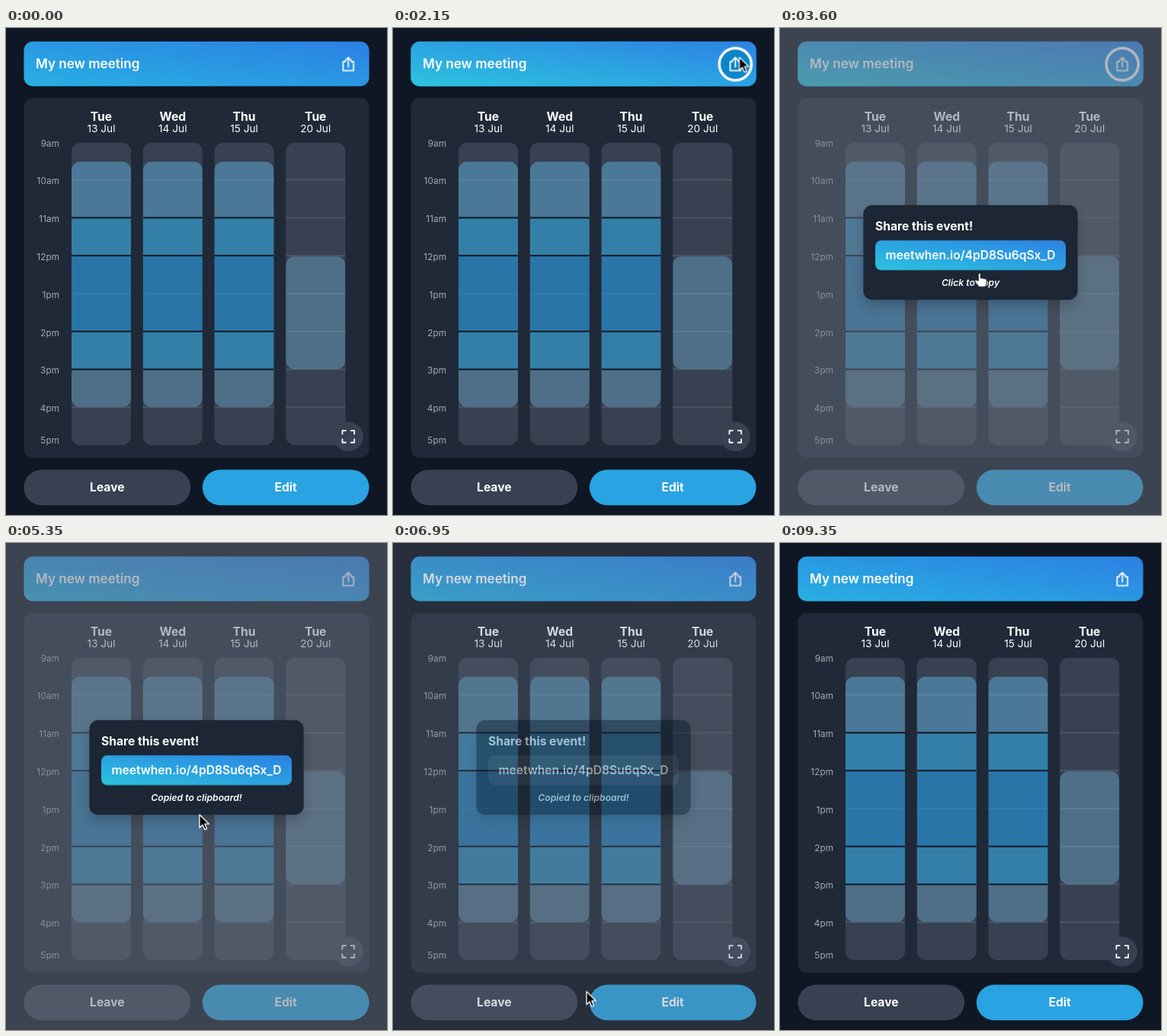
Recreate the animation shown at these times as an HTML page. Size 500 by 640 pixels, loop 9.5 s.

```html
<!DOCTYPE html>
<html lang="en">
<head>
<meta charset="utf-8">
<title>Meeting planner</title>
<style>
  html, body { margin: 0; width: 100%; height: 100%; overflow: hidden; background: #0f1724; }
  svg { display: block; width: 500px; height: 640px; }
  text { font-family: Inter, Roboto, "Liberation Sans", sans-serif; font-size: 16px; fill: #fff; }
  .semi { font-weight: 600; }
  .bold { font-weight: 700; }
  .mid { text-anchor: middle; }
  .date { font-size: 14px; }
  .hour { font-size: 12px; fill: #a3aab6; text-anchor: end; letter-spacing: .2px; }
  .note { font-size: 12.5px; font-weight: 600; font-style: italic; text-anchor: middle; }
  .icon { fill: none; stroke: #fff; stroke-width: 1.8; stroke-linecap: round; stroke-linejoin: round; }
  .off { opacity: 0; }
</style>
</head>
<body>
<svg viewBox="0 0 500 640">
  <defs>
    <linearGradient id="blue" x1="0" y1="1" x2="1" y2="0">
      <stop offset="0" stop-color="#28b0e2"/><stop offset="1" stop-color="#2b80e3"/>
    </linearGradient>
    <linearGradient id="cyan" x1="0" y1="1" x2="1" y2="0">
      <stop offset="0" stop-color="#2cc4df"/><stop offset="1" stop-color="#2c82e4"/>
    </linearGradient>
    <filter id="shadow" x="-20%" y="-30%" width="140%" height="170%">
      <feDropShadow dx="0" dy="8" stdDeviation="8" flood-color="#000" flood-opacity=".2"/>
    </filter>
  </defs>
  <rect width="500" height="640" fill="#0f1724"/>

  <g transform="scale(.9766) translate(0 .3)">
    <rect x="24" y="18" width="464" height="60" rx="12" fill="url(#blue)"/>
    <rect id="glow" class="off" x="24" y="18" width="464" height="60" rx="12" fill="url(#cyan)"/>
    <text class="semi" x="40" y="54.2" style="font-size:17.5px">My new meeting</text>
    <circle id="press" class="off" cx="460" cy="48.4" r="21" fill="#0a86c8"/>
    <path class="icon" d="M456 45h-3v12h14v-12h-3M460 52V40M456 43.500l4-4 4 4"/>
    <circle id="ring" class="off" cx="460" cy="48.4" r="21.600" fill="none" stroke="#fff" stroke-width="3.600"/>

    <rect x="24" y="94" width="464" height="484" rx="12" fill="#1f2937"/>
    <g id="plan"></g>
    <circle cx="460" cy="549.500" r="20" fill="#374151"/>
    <path class="icon" d="M452 546v-4.500h4.500M463.500 541.500h4.500v4.500M468 553v4.500h-4.500M456.500 557.500H452v-4.500"/>

    <rect x="24" y="594" width="224" height="48" rx="24" fill="#374151"/>
    <rect x="264" y="594" width="224" height="48" rx="24" fill="#29a3e1"/>
    <text class="bold mid" x="136" y="623.800">Leave</text>
    <text class="bold mid" x="376" y="623.800">Edit</text>
  </g>

  <g id="modal" class="off">
    <rect width="500" height="640" fill="#6b7280" opacity=".5"/>
    <g transform="scale(.9766) translate(0 .3)">
      <rect x="112" y="238" width="288" height="127.500" rx="12" fill="#1c2535" filter="url(#shadow)"/>
      <text class="bold" x="128" y="272">Share this event!</text>
      <rect x="128" y="285.500" width="256" height="40" rx="8" fill="#333d4c"/>
      <rect id="hover" class="off" x="128" y="285.500" width="256" height="40" rx="8" fill="url(#cyan)"/>
      <text class="semi mid" x="256" y="311.500">meetwhen.io/4pD8Su6qSx_D</text>
      <text id="before" class="note" x="256" y="346.500">Click to copy</text>
      <text id="after" class="note off" x="256" y="346.500">Copied to clipboard!</text>
    </g>
  </g>

  <g id="moveX"><g id="moveY">
    <path id="arrow" d="M0 0V17l4-3.800 2.800 6.400 2.800-1.200-2.700-6.200H12.500z"
      fill="#000" stroke="#fff" stroke-width="1.300" stroke-linejoin="round"/>
    <path id="hand" class="off" d="M-1.500 10V1.500a1.600 1.600 0 0 1 3.200 0V7c.4-1.200 2.800-1 3 .3.5-1 2.600-.7 2.700.6.6-.8 2.200-.3 2.200 1V12c0 3-1.500 4-1.800 6H-1c-.5-2-4-5-5-7.500-.6-1.500 1.200-2.200 2.200-1.200z"
      fill="#fff" stroke="#111" stroke-width="1" stroke-linejoin="round"/>
  </g></g>
</svg>

<script>
const LOOP = 9500;
const TOP = 154, HOUR = 51;
const $ = id => document.getElementById(id);

// Planner grid
const yAt = hour => TOP + (hour - 9) * HOUR;
const rect = (x, y, w, h, rest) => `<rect x="${x}" y="${y}" width="${w}" height="${h}" ${rest}/>`;
const label = (cls, x, y, str) => `<text class="${cls}" x="${x}" y="${y}">${str}</text>`;

const LIGHT = '#4f6f88';
const busy = [[9.5, 11, '#4a7896'], [11, 12, '#347fa8'], [12, 14, '#2a75a8'], [14, 15, '#347fa8'], [15, 16, LIGHT]];
const days = [
  ['Tue', '13 Jul', busy],
  ['Wed', '14 Jul', busy],
  ['Thu', '15 Jul', busy],
  ['Tue', '20 Jul', [[12, 15, LIGHT]]]
];

function column([name, date, slots], i) {
  const x = 88 + i * 96;
  const from = yAt(slots[0][0]), to = yAt(slots.at(-1)[1]) - 1;
  let out = label('bold mid', x + 40, 125, name) + label('date mid', x + 40, 140.5, date);
  out += rect(x, TOP, 80, 407, 'rx="12" fill="#374151"');
  for (let h = 10; h < 17; h++) out += rect(x, yAt(h) - 2, 80, 2, 'fill="#4b5563"');
  out += `<clipPath id="clip${i}">${rect(x, from, 80, to - from, 'rx="12"')}</clipPath><g clip-path="url(#clip${i})">`;
  for (const [a, b, fill] of slots) out += rect(x, yAt(a), 80, (b - a) * HOUR, `fill="${fill}"`);
  for (let h = 10; h < 16; h++) {
    const edge = slots.some(s => s[0] === h && s !== slots[0]);
    const look = edge ? 'fill="#0f1724"' : `fill="#fff" opacity="${h === 13 && slots === busy ? .04 : .09}"`;
    out += rect(x, yAt(h) - 2, 80, 2, look);
  }
  return out + '</g>';
}

let plan = days.map(column).join('');
for (let h = 9; h <= 17; h++) {
  const name = h < 12 ? h + 'am' : (h === 12 ? 12 : h - 12) + 'pm';
  plan += label('hour', 72, h === 17 ? 558.3 : yAt(h) + 5, name);
}
$('plan').innerHTML = plan;

// Motion: rows of [ms, value, easing towards the next row]
const QUAD = 'cubic-bezier(.455,.03,.515,.955)';
const SOFT = 'cubic-bezier(.4,0,.2,1)';

function play(id, prop, rows, wrap = v => v) {
  const all = [[0, rows[0][1]], ...rows, [LOOP, rows.at(-1)[1]]];
  $(id).animate(
    all.map(([t, v, easing = 'linear']) => ({ offset: t / LOOP, [prop]: wrap(v), easing })),
    { duration: LOOP, iterations: Infinity }
  );
}
const fade = (id, ...rows) => play(id, 'opacity', rows);
const show = (id, on, off) => fade(id, [on, 0], [on, 1], [off, 1], [off, 0]);
const hide = (id, off, on) => fade(id, [off, 1], [off, 0], [on, 0], [on, 1]);

play('moveX', 'transform', [
  [1560, 254, QUAD], [2090, 454.5], [2770, 454.5, QUAD], [3730, 254]
], v => `translate(${v}px, 0px)`);
play('moveY', 'transform', [
  [1560, 652, QUAD], [2090, 38.5], [2770, 38.5, QUAD], [3800, 345],
  [5170, 345, QUAD], [6350, 589.5], [7270, 589.5, 'ease-in'], [7650, 652]
], v => `translate(0px, ${v}px)`);

show('hand', 3430, 5320);
hide('arrow', 3430, 5320);

fade('glow', [2020, 0], [2120, 1], [4750, 1], [4850, 0]);
fade('press', [2020, 0], [2110, 1], [2200, 1], [2340, 0]);
fade('ring', [2090, 0], [2140, 1], [4750, 1], [4800, 0]);
fade('modal', [2180, 0, SOFT], [2340, 1], [6860, 1, SOFT], [7130, 0]);
fade('hover', [3430, 0, SOFT], [3580, 1], [5350, 1, SOFT], [5500, 0]);
hide('before', 4750, 7200);
show('after', 4750, 7200);
</script>
</body>
</html>
```
